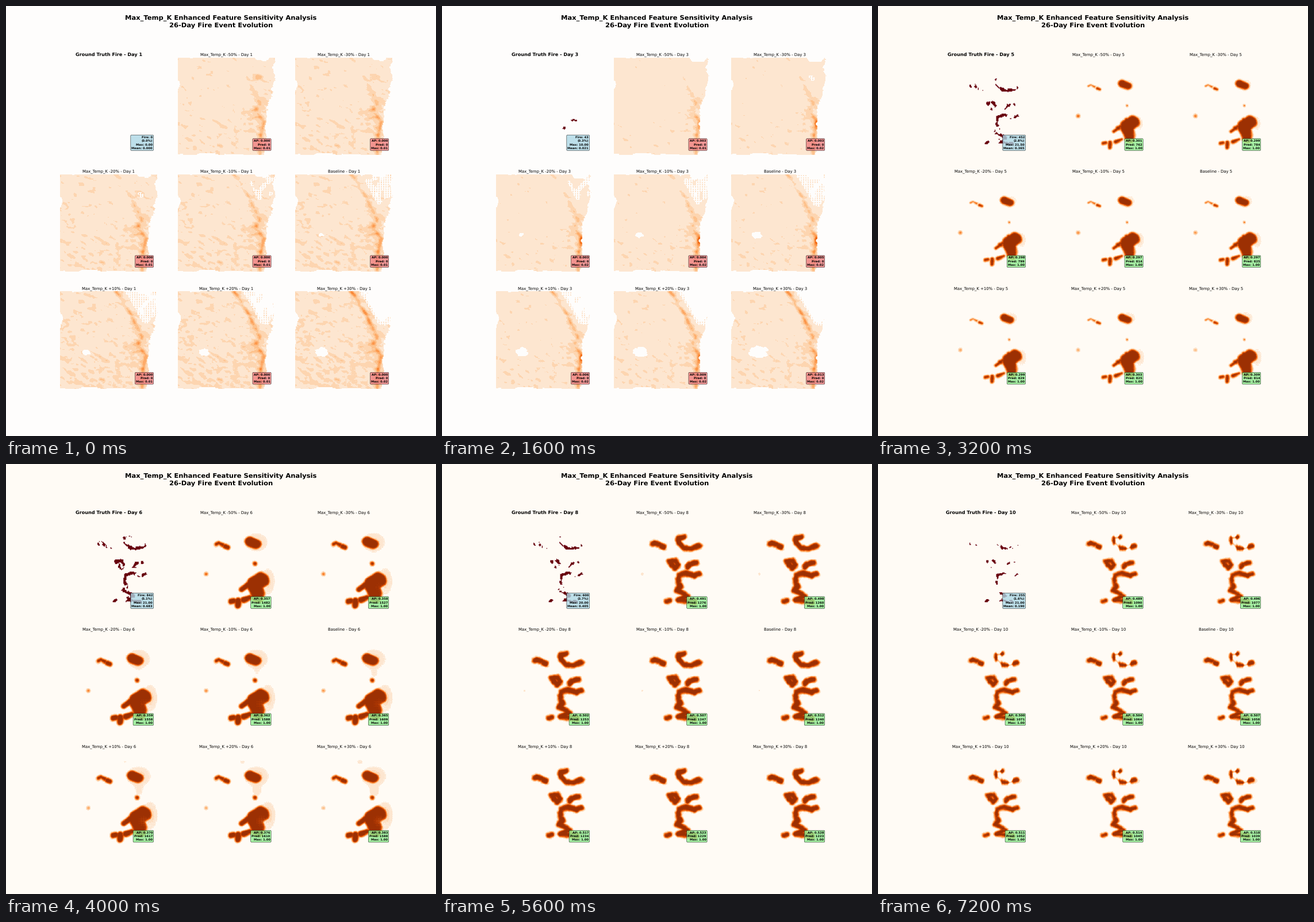
A matplotlib script that plays this animation: 748x748 px, repeating every 8 s.

```python
import numpy as np
import matplotlib.pyplot as plt
from matplotlib.animation import FuncAnimation
from matplotlib.colors import ListedColormap
from matplotlib.patches import Rectangle

plt.rcParams["font.family"] = "DejaVu Sans"
plt.rcParams["text.hinting"] = "none"

N = 128          # cells per side
SIDE = 169.4     # panel side in pixels, the unit of all coordinates below
DAYS = 10
CHANGES = [-50, -30, -20, -10, 0, 10, 20, 30]

AXIS = (np.arange(N) + .5) * SIDE / N
X, Y = np.meshgrid(AXIS, AXIS)
COL, ROW = np.meshgrid(np.arange(N), np.arange(N))
DOTS = (COL % 2) * (ROW % 2)
GRID = (COL % 3 == 0) | (ROW % 3 == 0)

ORANGES = ListedColormap([
    (1, 1, 1, 0), "#fde6d0", "#fdd5b0", "#fdc28d", "#fdab69", "#fb9549",
    "#f87f2d", "#ee6a17", "#df5207", "#c84202", "#b13802", "#9c3003"])


def noise(seed, along, across, degrees=0):
    """Smooth random field, stretched along one direction."""
    fx, fy = np.meshgrid(np.fft.fftfreq(N), np.fft.fftfreq(N))
    c, s = np.cos(np.radians(degrees)), np.sin(np.radians(degrees))
    a, b = fx * c + fy * s, fy * c - fx * s
    blur = np.exp(-2 * np.pi**2 * ((along * a)**2 + (across * b)**2))
    white = np.random.default_rng(seed).normal(size=(N, N))
    field = np.fft.ifft2(np.fft.fft2(white) * blur).real
    return field / field.std()


def distance(*paths):
    """Distance of every cell to the nearest polyline."""
    best = np.full((N, N), 1e3)
    for path in paths:
        for (x0, y0), (x1, y1) in zip(path, path[1:] or path):
            dx, dy = x1 - x0, y1 - y0
            t = ((X - x0) * dx + (Y - y0) * dy) / max(dx * dx + dy * dy, 1e-9)
            t = np.clip(t, 0, 1)
            best = np.minimum(best, np.hypot(X - x0 - t * dx, Y - y0 - t * dy))
    return best


def bump(x, y, rx, ry=None):
    return np.exp(-((X - x) / rx)**2 - ((Y - y) / (ry or rx))**2)


def step(z):
    return 1 / (1 + np.exp(-z))


TEX = noise(3, 2.6, 1.4, 25)
FINE = noise(8, 1.2, .8, 15)
CLOUD = noise(5, 3.5, 3.5)
GRAIN = noise(11, .6, .6)
CLUMP = noise(21, 1.5, 1.5)

RIDGE_PATH = [(98, 0), (119, 34), (142, 79), (137, 92), (149, 112), (144, 135),
              (142, 169)]
RIDGE = distance(RIDGE_PATH)
RIDGE_X = np.interp(Y, [y for _, y in RIDGE_PATH], [x for x, _ in RIDGE_PATH])
STREAKS = distance([(62, 110), (84, 122)], [(70, 153), (76, 154)],
                   [(112, 97), (136, 91)], [(122, 107), (140, 104)])


def haze(day, p):
    """Low, widespread predictions of the first three days."""
    late, strong = day == 3, day == 2
    low = .14 + .05 * p + strong * .42 * p**2
    top = .02 + .2 * p**2 + strong * .32 * p**2
    upper = step((62 - Y) / 8)
    amp = low * (1 - upper) + top * upper
    crest = .8 * np.exp(-(RIDGE / 3.2)**2) + .3 * np.exp(-(RIDGE / 10)**2)

    v = .125 + .025 * p + strong * .012 - late * .02
    v += .022 * TEX + .012 * FINE + .03 * (Y / SIDE - .5)
    v += (.05 if late else .1) * np.exp(-(STREAKS / 2.6)**2)
    v += amp * crest * (1 + .25 * TEX)
    v += (1 - p) * .05 * np.exp(-((X - 152) / 12)**2 - ((Y - 75) / 45)**2)
    v -= .02 * DOTS * (X > 70)
    if day == 1:
        v += .12 * bump(135, 90, 5) + .2 * (1 - p)**2 * bump(139, 35, 8, 5)
    if late:
        v += (.12 + .34 * np.sin(np.pi * p)) * bump(148, 115, 4, 7)
    v = np.clip(v, .1, .95)

    # Ragged outer border
    edge = 167 - 10 * step((Y - 72) / 4) - .03 * Y - late * 4
    v[X > edge + 1.2 * CLOUD[:, 60:61] + FINE] = 0
    v[Y < .5 * CLOUD[40:41] + (X > 140)] = 0
    v[Y > SIDE - .8 - .9 * CLOUD[90:91]] = 0
    v[X < 3 * (CLOUD[:, 20:21] - 2.2 + p)] = 0
    v[np.hypot((X - 145) / 1.7, Y) < 6 + 2 * CLOUD + 2 * late] = 0

    # Thinned-out corner beyond the ridge
    corner = np.clip((X - RIDGE_X - 12) / 10, 0, 1) * np.clip((60 - Y) / 8, 0, 1)
    sparse = corner * (.35 * CLOUD + 2.2 * (p - .57) + .3 * late)
    v[(sparse > .12) & GRID] = 0
    v[sparse > .7] = 0

    # Clear patch on the left
    start = .375 if late else .6
    if p >= start:
        hole = np.hypot((X - 43 - 4 * p) / 1.25, Y - 106) + CLOUD + .7 * FINE
        v[hole < 3 + 14 * (p - start)] = 0
    return v


# Lines along which the fire keeps burning
WEST = [[(67, 50), (71, 48), (77, 51)], [(82, 54), (87, 56)]]
ARCH = [(121, 38), (112, 40), (112, 48), (122, 57), (134, 58), (148, 53)]
RING = [(96, 80), (107, 79), (111, 86), (106, 92), (96, 80)]
HOOK = [(143, 82), (132, 84), (128, 90)]
SPINE = [(148, 102), (138, 105), (125, 100), (113, 104), (112, 117), (116, 124),
         (109, 130), (128, 140), (112, 147), (140, 150)]
SOUTH = [(92, 149), (97, 148)]
FRONT = distance(*WEST, ARCH, RING, HOOK, SPINE, SOUTH)
IGNITION = [[(133, 109), (139, 110)], [(118, 123), (119, 123)]]


def first_blobs():
    """Round growth from the ignition points, still without clear fronts."""
    core = distance([(146, 111), (132, 121), (138, 138)]) - 12
    north = distance([(126, 46), (136, 50)]) - 9
    arms = distance([(104, 147), (104, 157)], SOUTH, [(111, 129), (122, 120)],
                    [(134, 84)], [(114, 146), (125, 142)]) - 4
    west = distance(*WEST) - 3
    return np.minimum.reduce([core, north, arms, west]) + .8 * CLOUD


def fronts(day):
    """Bands around the burning lines; the arch breaks up with time."""
    gaps = np.clip(np.cos((X - 116) * np.pi / 10), 0, 1) * (Y < 65) * (X > 100)
    return FRONT - 4.4 + (day - 8) * (.5 + 2.5 * gaps) + .5 * CLUMP


def predicted(day):
    seeds = distance(*IGNITION) - 3.2
    if day == 4:
        return seeds
    if day == 5:
        return np.minimum(seeds, first_blobs() + 2.5)
    if day == 6:
        return first_blobs()
    if day == 7:
        return (first_blobs() + fronts(8)) / 2
    return fronts(day)


def prediction(day, p):
    if day < 4:
        return haze(day, p)
    v = step((.4 - predicted(day)) / .95)
    if 5 <= day <= 8:
        v += .7 * .45**max(day - 6, 0) * (1 - .5 * p) * bump(49, 102, 3.4)
    if 5 <= day <= 7:
        glow = (.2 if day == 6 else .1) * (1 + .2 * p)
        halo = bump(136, 47, 21, 17) + bump(156, 115, 13, 24)
        halo += p * (.6 * bump(137, 74, 9, 10) + .5 * bump(112, 22, 7, 5))
        v = np.maximum(v, glow * halo * (1 - .3 * DOTS))
    if day == 6:
        v -= (.1 + .45 * p) * DOTS * bump(146, 125, 9, 8)
    if day >= 9:
        v += .25 * bump(122, 38, 2.2) + .18 * p * bump(152, 55, 5)
    return np.clip(v, 0, 1)


def burning(day):
    """Cells on fire: patchy at first, scattered remains at the end."""
    if day < 3:
        return np.zeros((N, N))
    if day < 5:
        return distance(*IGNITION) < 1.9 + .45 * GRAIN
    width = 2.4 - .15 * abs(day - 6)
    cut = -1.1 + .32 * max(day - 6, 0) + .5 * (day == 5)
    return (FRONT < width + .5 * GRAIN) & (CLUMP > cut)


def curve(p, start, end, power=1, bulge=0):
    return start + (end - start) * p**power + bulge * p * np.sin(np.pi * p)


# How the scores run across the eight settings on the key days
PRECISION = {2: (0, 0), 3: (.003, .013, 4), 4: (.246, .235, 1, -.018),
             6: (.357, .383, 2.4), 8: (.491, .528, 1.2), 10: (.489, .518)}
COUNT = {3: (0, 0), 4: (41, 39.4, 1.5), 6: (1482, 1588, 1, 105),
         8: (1276, 1223, .85), 10: (1090, 1039)}


def score(keys, day, p):
    return np.interp(day, list(keys), [curve(p, *k) for k in keys.values()])


def highest(day, p):
    if day < 4:
        return .01 + .01 * (p > 1.4 - .4 * day)
    return 1 - .006 * p * (day == 4)


def truth(day):
    def at(*values):
        return np.interp(day, [2, 3, 4, 6, 8, 10], values)
    fire = round(at(0, 43, 62, 842, 600, 255))
    return (f"Fire: {fire}\n({fire / N**2:.1%})\n"
            f"Max: {at(0, 10, 22, 21, 20, 21):.2f}\n"
            f"Mean: {at(0, .021, .048, .683, .405, .190):.3f}")


def box_color(ap):
    return "lightcoral" if ap < .1 else "white" if ap < .28 else "lightgreen"


fig, axes = plt.subplots(3, 3, figsize=(18, 18), dpi=748 / 18)
backdrop = fig.add_artist(Rectangle((0, 0), 1, 1, transform=fig.transFigure,
                                    lw=0, zorder=-10))
fig.suptitle("Max_Temp_K Enhanced Feature Sensitivity Analysis\n"
             "26-Day Fire Event Evolution", fontsize=20, fontweight="bold",
             linespacing=1.27)

images, notes = [], []
for ax in axes.flat:
    ax.axis("off")
    images.append(ax.imshow(np.zeros((N, N)), cmap=ORANGES, vmin=0, vmax=1))
    notes.append(ax.text(.95, .055, "", transform=ax.transAxes, fontsize=9,
                         fontweight="bold", ha="right", va="bottom",
                         linespacing=1.4,
                         bbox=dict(boxstyle="round,pad=0.3", alpha=.8,
                                   facecolor="lightblue", edgecolor="black")))


def update(frame):
    day = frame + 1
    backdrop.set_facecolor("#fefdfc" if day < 4 else "#fffbf5")

    cells = np.zeros((N, N, 4))
    cells[..., 0], cells[..., 2] = 103 / 255, 13 / 255
    cells[..., 3] = burning(day)
    images[0].set_data(cells)
    notes[0].set_text(truth(day))
    axes.flat[0].set_title(f"Ground Truth Fire - Day {day}", fontsize=14,
                           fontweight="bold")

    panels = zip(CHANGES, axes.flat[1:], images[1:], notes[1:])
    for change, ax, image, note in panels:
        p = (change + 50) / 80
        name = f"Max_Temp_K {change:+d}%" if change else "Baseline"
        ax.set_title(f"{name} - Day {day}", fontsize=12)
        image.set_data(prediction(day, p))
        ap = score(PRECISION, day, p)
        note.set_text(f"AP: {ap:.3f}\nPred: {score(COUNT, day, p):.0f}\n"
                      f"Max: {highest(day, p):.2f}")
        note.get_bbox_patch().set_facecolor(box_color(ap))
    return images + notes


anim = FuncAnimation(fig, update, frames=DAYS, interval=800, repeat=True,
                     repeat_delay=0, blit=False)
plt.show()
```
